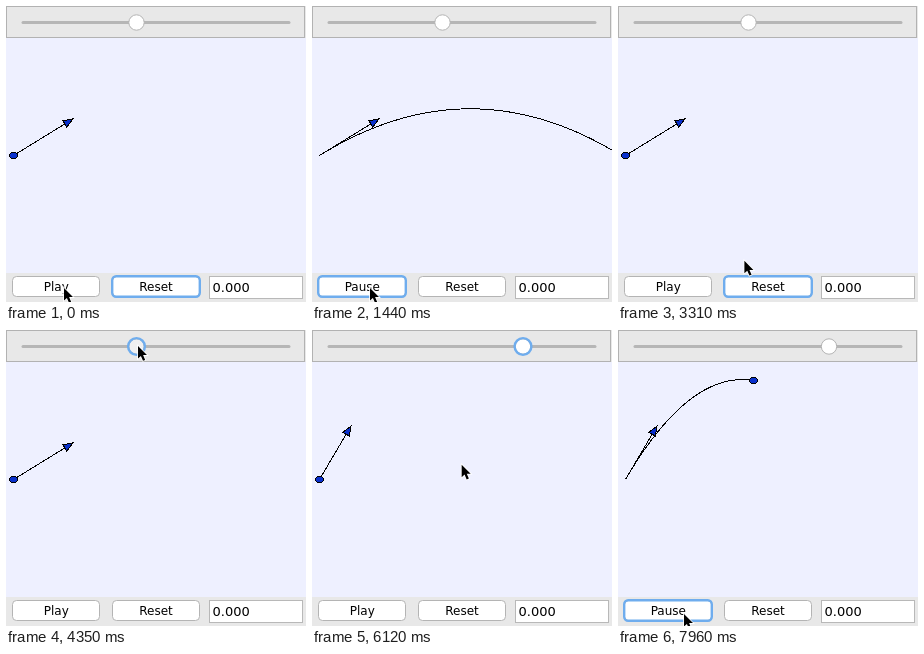
Animation of 300x296 px, one loop 8000 ms. Source, as an HTML page:

```html
<!DOCTYPE html>
<html lang="en">
<head>
<meta charset="utf-8">
<title>Projectile launcher</title>
<style>
  html, body { margin: 0; width: 100%; height: 100%; overflow: hidden; background: #e8e8e8; }
  svg { display: block; width: 300px; height: 296px; }
  text { font: 12px "DejaVu Sans", sans-serif; fill: #000; }
  .mid { text-anchor: middle; }
  .crisp { shape-rendering: crispEdges; }
  .ring { fill: none; stroke: #6fadee; stroke-width: 2.4; }
  .face { fill: #fff; stroke: #b4b4b4; }
  .down .face { fill: url(#blue); stroke: #2a6fd6; }
  .solid { fill: #0a30cc; stroke: #000; }
  .line { fill: none; stroke: #000; }
</style>
</head>
<body>
<svg viewBox="0 0 300 296">
  <defs>
    <linearGradient id="blue" x2="0" y2="1">
      <stop offset="0" stop-color="#57a4fb"/>
      <stop offset="1" stop-color="#0c5fe6"/>
    </linearGradient>
    <clipPath id="view"><rect y="32" width="300" height="235"/></clipPath>
  </defs>

  <rect width="300" height="296" fill="#e8e8e8"/>
  <rect x="0.5" y="0.5" width="298" height="31" fill="#e8e8e8" stroke="#b2b2b2"/>
  <rect y="32" width="300" height="235" fill="#eef0ff"/>

  <rect x="15.5" y="15" width="269" height="3" rx="1.5" fill="#b6b6b6"/>
  <g id="knob">
    <circle id="cap" r="7.7" stroke="#b4b4b4"/>
    <circle class="ring" r="8.4"/>
  </g>

  <g clip-path="url(#view)">
    <polyline id="trail" class="line crisp"/>
    <line id="shaft" class="line crisp" x1="7.5" y1="149.5"/>
    <polygon id="head" class="solid crisp"/>
    <ellipse id="ball" class="solid crisp" rx="4" ry="3.4"/>
  </g>

  <g id="play">
    <rect class="face" x="6.5" y="270.5" width="87" height="20" rx="4"/>
    <rect class="ring" x="6.2" y="270.2" width="87.6" height="20.6" rx="4"/>
    <text class="mid" x="50.3" y="285"></text>
  </g>
  <g id="reset">
    <rect class="face" x="106.5" y="270.5" width="87" height="20" rx="4"/>
    <rect class="ring" x="106.2" y="270.2" width="87.6" height="20.6" rx="4"/>
    <text class="mid" x="150" y="285">Reset</text>
  </g>
  <rect x="203.5" y="270.5" width="93" height="22" fill="#fff" stroke="#b8b8b8"/>
  <text x="206.5" y="286" style="font-size:13px">0.000</text>

  <path id="cursor" d="M0 0V12.5L2.9 9.9L5 14.8L7.2 13.9L5.1 9.1H9Z"
        stroke="#fff" stroke-width="1.6" paint-order="stroke"/>
</svg>
<script>
const LOOP = 8000;
const ORIGIN = { x: 7.5, y: 149.5 };
const SCALE = { x: 75.9, y: 58.8 };
const $ = id => document.getElementById(id);

const set = (el, attrs) => {
  for (const key in attrs) el.setAttribute(key, attrs[key]);
};
const within = (t, a, b) => t >= a && t < b;
const mix = (a, b, k) => a + (b - a) * k;
const ease = k => (1 - Math.cos(Math.PI * k)) / 2;

// Number of screen updates done since start, at most n
const steps = (t, start, n, dt = 80) =>
  Math.max(0, Math.min(n, Math.floor((t - start) / dt) + 1));
const glide = (t, start, n) => ease(steps(t, start, n) / n);

// Late nudges of the slider: [time, x]
const NUDGES = [[5070, 206], [5230, 207.5], [5310, 209.5], [5390, 211]];

function sliderX(t) {
  let x = mix(130.5, 204, glide(t, 4430, 8));
  for (const [at, to] of NUDGES) if (t >= at) x = to;
  return x;
}

function cursorAt(t, knobX) {
  if (t < 3230) {
    const k = glide(t, 2100, 6);
    return [mix(58, 130, k), mix(282, 280, k)];
  }
  if (t < 4200) {
    const k = glide(t, 3230, 10);
    return [mix(130, 132, k) - 44 * k * (1 - k), mix(280, 16, k)];
  }
  if (t < 5800) {
    const k = (knobX - 130.5) / 80.5;
    return [knobX + 1.5, mix(16, 22.5, k)];
  }
  const k = glide(t, 5800, 11);
  return [mix(212.5, 66, k), mix(22.5, 284, k)];
}

function flightAt(t) {
  if (within(t, 320, 2740)) {
    const n = steps(t, 320, 15);
    return n < 15 ? n * 24.45 : 400;
  }
  return t >= 7090 ? steps(t, 7090, 12, 79) * 25.7 : 0;
}

const pathPoint = (u, angle) => [
  ORIGIN.x + u * Math.cos(angle),
  ORIGIN.y - u * 0.78 * Math.sin(angle) + 0.00126 * u * u
];

function drawArrow(angle) {
  const dx = SCALE.x * Math.cos(angle), dy = -SCALE.y * Math.sin(angle);
  const len = Math.hypot(dx, dy), ux = dx / len, uy = dy / len;
  const tip = [ORIGIN.x + dx, ORIGIN.y + dy];
  const base = [tip[0] - 9.5 * ux, tip[1] - 9.5 * uy];
  const corner = w => [base[0] - w * uy, base[1] + w * ux];
  set($("shaft"), { x2: base[0], y2: base[1] });
  set($("head"), { points: [tip, corner(3.8), corner(-3.8)].join(" ") });
}

function drawFlight(u, angle) {
  const points = [];
  for (let s = 0; s < u; s += 6) points.push(pathPoint(s, angle));
  const [cx, cy] = pathPoint(u, angle);
  points.push([cx, cy]);
  set($("trail"), { points: u ? points.join(" ") : "" });
  set($("ball"), { cx, cy });
}

function drawControl(id, focused, down) {
  const el = $(id);
  el.classList.toggle("down", down);
  el.querySelector(".ring").style.display = focused ? "" : "none";
}

function render(t) {
  const x = sliderX(t);
  const angle = (x - 16) / 268 * Math.PI / 2;

  set($("knob"), { transform: `translate(${x} 16.5)` });
  set($("cap"), { fill: within(t, 4200, 5640) ? "#f0f0f0" : "#fff" });
  drawArrow(angle);
  drawFlight(flightAt(t), angle);

  drawControl("knob", within(t, 4200, 6680), false);
  drawControl("play", within(t, 80, 2580) || t >= 6680,
    within(t, 80, 320) || within(t, 6680, 7090));
  drawControl("reset", t < 80 || within(t, 2580, 4200), within(t, 2580, 2740));
  $("play").querySelector("text").textContent =
    within(t, 320, 2740) || t >= 7090 ? "Pause" : "Play";

  set($("cursor"), { transform: `translate(${cursorAt(t, x)})` });
}

const start = performance.now();
function tick() {
  render((performance.now() - start) % LOOP);
  requestAnimationFrame(tick);
}
tick();
</script>
</body>
</html>
```
